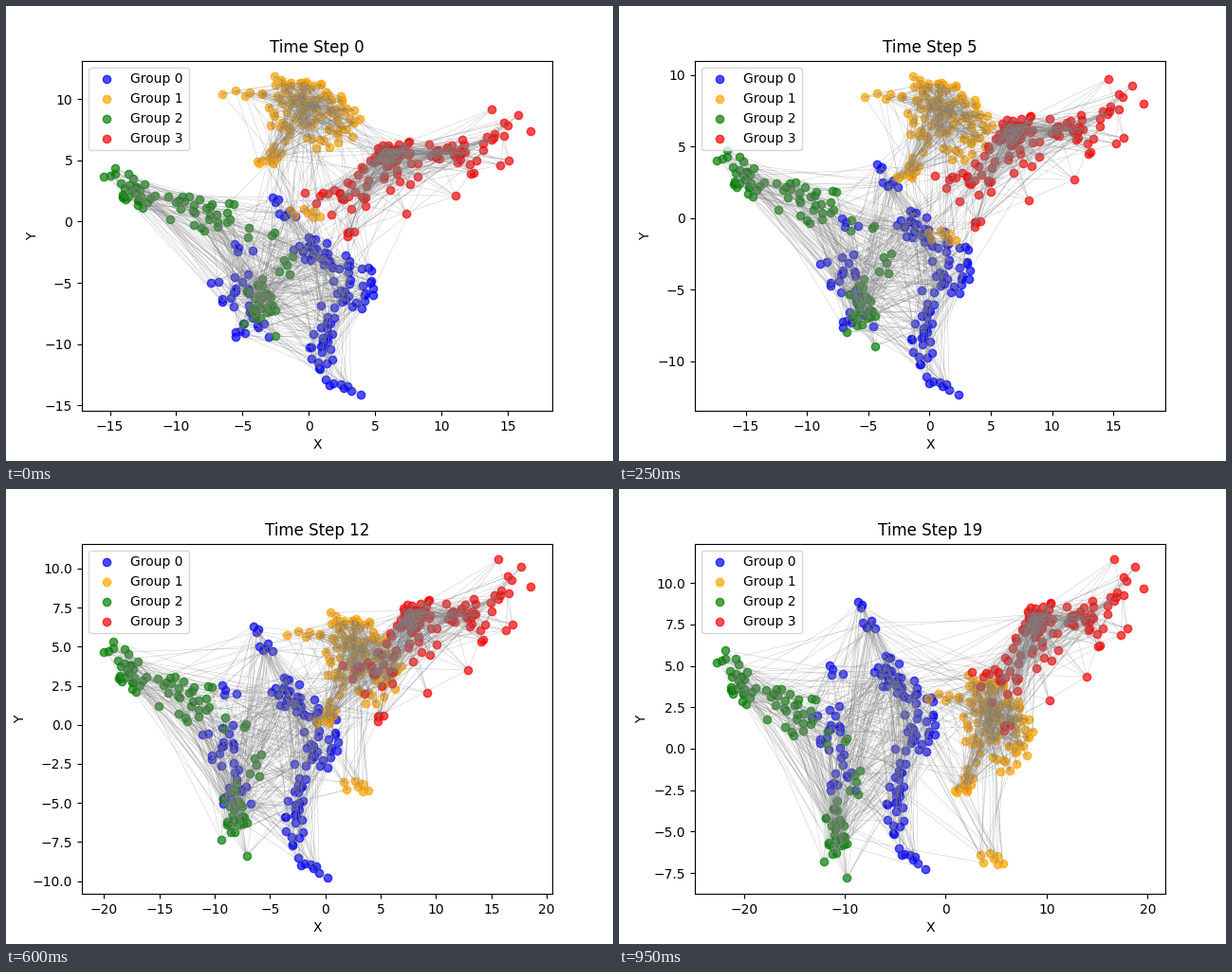
These frames come from a looping animation (640 px wide and 480 px high, 1 s). A matplotlib script:

```python
import matplotlib.pyplot as plt
import numpy as np
from matplotlib.animation import FuncAnimation
from matplotlib.collections import LineCollection

STEPS = 20
rng = np.random.default_rng(5)


def strand(start, end, width, count):
    """Points spread evenly along a segment, scattered around it."""
    along = (np.arange(count) + rng.random(count))[:, None] / count
    scatter = np.clip(rng.normal(size=(count, 2)), -1.6, 1.6) * width
    return np.array(start) + along * np.subtract(end, start) + scatter


def group(outliers, *strands):
    return np.vstack([outliers, *(strand(*s) for s in strands)])


blue = group(
    [(3.9, -14.16), (-7.4, -5), (-5.3, -2.1), (-2.75, 1.97)],
    ((-2.8, 1.3), (-0.8, 0.5), 0.35, 8),
    ((-1.2, -1.6), (2, -2.9), 0.65, 26),
    ((2.2, -3.7), (3.4, -6.8), 0.85, 26),
    ((4.6, -3.8), (4.5, -6.6), 0.2, 8),
    ((1.6, -7.5), (0.8, -12.2), 0.6, 27),
    ((1.3, -13), (3.5, -13.8), 0.2, 7),
    ((-5.5, -3), (-4.5, -9.8), 1, 30),
)
orange = group(
    [(-6.56, 10.4), (-2.62, 11.84), (3.8, 8.4)],
    ((-5.8, 10.5), (-3, 10.4), 0.12, 5),
    ((-2.4, 11.3), (1.2, 10.9), 0.3, 13),
    ((-2, 10.3), (2.7, 8.4), 0.85, 70),
    ((-2.5, 8.2), (2.5, 6.2), 0.65, 20),
    ((-3.5, 4.7), (-2.3, 5.6), 0.45, 14),
    ((-1.4, 0.7), (1.2, 0.8), 0.25, 7),
)
green = group(
    [(-15.5, 3.65), (-14.6, 4.37), (-2.55, -9.35)],
    ((-14.4, 3.2), (-12.2, 1.5), 0.65, 26),
    ((-10, 1.3), (-6.2, 0.2), 0.75, 28),
    ((-4.2, -1), (-1.2, -4.5), 0.9, 9),
    ((-3.5, -5.3), (-3.9, -8.2), 0.7, 28),
)
red = group(
    [(16.73, 7.4), (15.8, 8.7), (13.8, 9.16), (7.35, 0.65), (11.05, 2.1)],
    ((5.1, 5.3), (7, 5.7), 0.5, 46),
    ((8.3, 5.6), (12, 6), 0.7, 24),
    ((11.5, 4.8), (15, 7), 0.85, 18),
    ((0.5, 1.6), (4.6, 2.5), 0.7, 22),
    ((3.8, 4.3), (8, 3.2), 0.7, 14),
    ((2.6, -1), (3.3, -1), 0.12, 4),
)

# color, start positions, drift per step
GROUPS = [
    ("blue", blue, (-0.312, 0.3626)),
    ("orange", orange, (0.2535, -0.388)),
    ("green", green, (-0.3805, 0.0815)),
    ("red", red, (0.153, 0.1184)),
]

# group a, group b, number of links, distance over which links fade out
LINKS = [(0, 0, 360, 7), (1, 1, 480, 4.5), (2, 2, 230, 8), (3, 3, 560, 5.5),
         (0, 2, 210, 6), (1, 3, 40, 4), (0, 1, 35, 3), (0, 3, 40, 3),
         (1, 2, 3, 8)]


def pick_links(a, b, count, reach):
    """Choose random point pairs, favouring near neighbours."""
    pa, pb = GROUPS[a][1], GROUPS[b][1]
    distance = np.linalg.norm(pa[:, None] - pb[None], axis=2)
    weight = np.exp(-distance / reach)
    if a == b:
        weight = np.triu(weight, 1)
    chosen = rng.choice(weight.size, count, replace=False,
                        p=weight.ravel() / weight.sum())
    return a, b, *np.unravel_index(chosen, weight.shape)


EDGES = [pick_links(*link) for link in LINKS]

fig, ax = plt.subplots(figsize=(6.4, 4.8), dpi=100)


def update(step):
    ax.clear()
    places = [start + step * np.array(drift) for _, start, drift in GROUPS]
    for number, (color, _, _) in enumerate(GROUPS):
        ax.scatter(*places[number].T, color=color, alpha=0.7,
                   label=f"Group {number}")
    segments = np.concatenate([
        np.stack([places[a][i], places[b][j]], axis=1)
        for a, b, i, j in EDGES])
    ax.add_collection(LineCollection(segments, colors="gray", alpha=0.5,
                                     linewidths=0.3, zorder=2))
    ax.set_title(f"Time Step {step}")
    ax.set_xlabel("X")
    ax.set_ylabel("Y")
    ax.legend(loc="upper left")


animation = FuncAnimation(fig, update, frames=STEPS, interval=50,
                          init_func=lambda: None, repeat=True)
plt.show()
```
